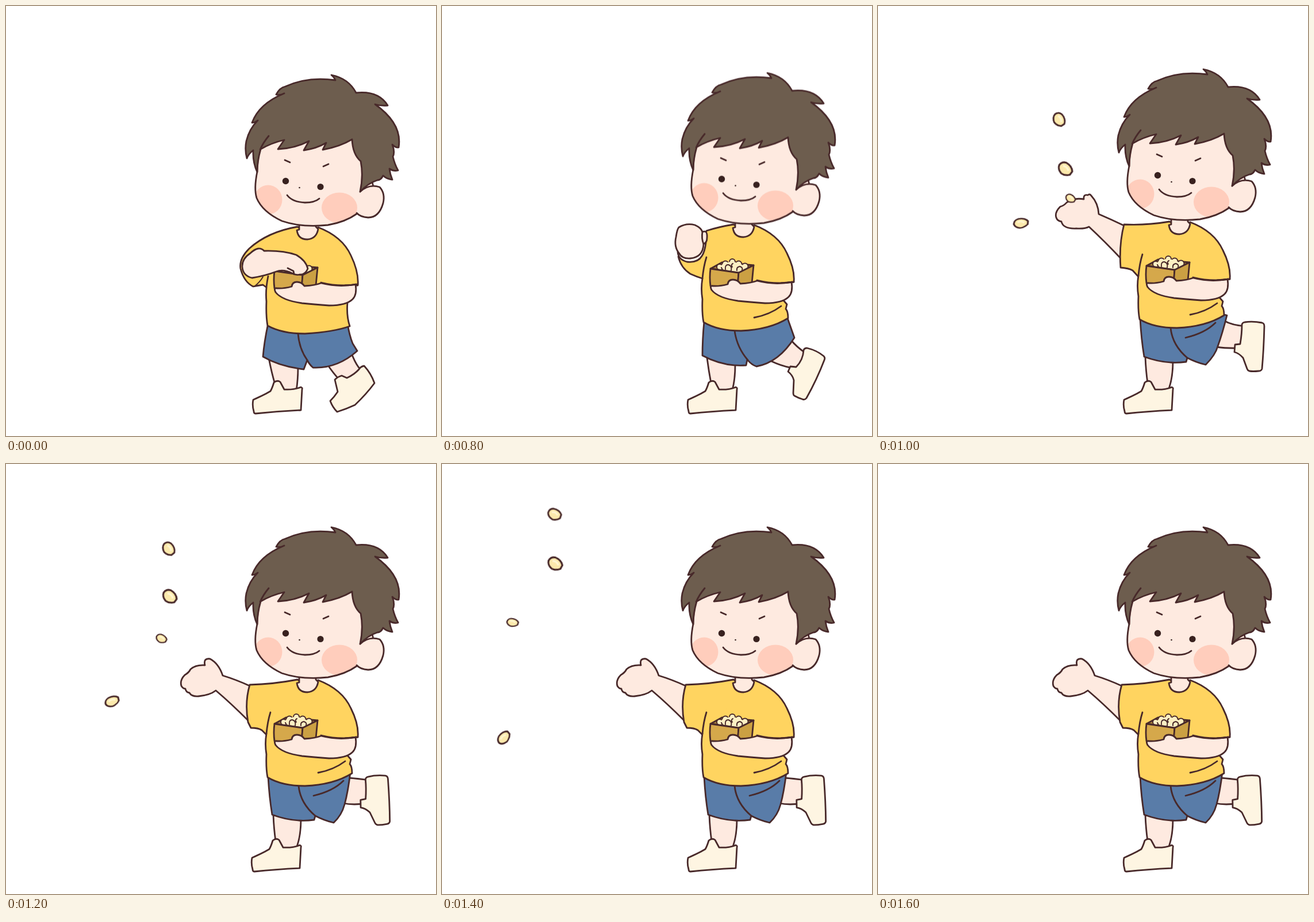
An HTML page without scripts for the animation above (1800 ms loop, 748 px wide and 748 px high).

```html
<!DOCTYPE html>
<html lang="en">
<head>
<meta charset="utf-8">
<title>Boy tossing popcorn</title>
<style>
  html, body { margin: 0; width: 100%; height: 100%; overflow: hidden; background: #fff; }
  svg { display: block; width: 100vw; height: 100vh; }

  .ink { stroke: #48292a; stroke-width: 2.8; stroke-linecap: round; stroke-linejoin: round; fill: none; }
  .skin { fill: #feeae0; }
  .shirt { fill: #ffd460; }
  .shorts { fill: #597ca8; }
  .shoe { fill: #fef5e2; }
  .hair { fill: #6d5d4e; }
  .corn { fill: #fdf0c4; }
  .thin { stroke-width: 2; }
  .dot { fill: #38211f; }
  .cheek { fill: #ffcdbc; }
  .kernel .ink { stroke-width: 2.9; }

  /* Poses are held, then switched hard. */
  .ready, .wind, .toss, .hold, .after, .thrown, .lift, .kernel {
    animation: 1.8s step-end infinite;
  }
  .ready { animation-name: ready; }
  .wind { animation-name: wind; }
  .toss { animation-name: toss; }
  .hold { animation-name: hold; }
  .after { animation-name: after; }
  .thrown { animation-name: thrown; }
  .lift { animation-name: lift; }
  .kernel { animation-name: fly; }

  @keyframes ready { 0% { visibility: visible } 44.44%, 100% { visibility: hidden } }
  @keyframes after { 0% { visibility: hidden } 44.44%, 100% { visibility: visible } }
  @keyframes wind { 0% { visibility: hidden } 44.44% { visibility: visible } 55.55%, 100% { visibility: hidden } }
  @keyframes toss { 0% { visibility: hidden } 55.55% { visibility: visible } 66.66%, 100% { visibility: hidden } }
  @keyframes hold { 0% { visibility: hidden } 66.66%, 100% { visibility: visible } }
  @keyframes thrown { 0% { visibility: hidden } 55.55%, 100% { visibility: visible } }
  @keyframes lift {
    0% { transform: translateY(var(--low)) }
    44.44% { transform: translateY(var(--mid)) }
    55.55%, 100% { transform: translateY(var(--high)) }
  }
  @keyframes fly {
    0% { visibility: hidden }
    55.55% { visibility: visible; transform: var(--near) }
    66.66% { visibility: visible; transform: var(--mid) }
    77.77% { visibility: visible; transform: var(--far) }
    88.88%, 100% { visibility: hidden }
  }
  .torso { --low: 4px; --mid: 0px; --high: -5px; }
  .head { --low: 0px; --mid: -3.5px; --high: -10px; }
</style>
</head>
<body>
<svg viewBox="0 0 748 748">
  <defs>
    <path id="front-shoe" class="shoe" d="M428 685Q450 675 458 670Q461 665 464 655Q470 650 475 654L482 667Q499 668 511 663Q514 664 513 667L511 703Q470 705 432 709Q429 709 429 705Q426 695 428 685Z"/>
    <path id="back-shoe" class="shoe" d="M633 555Q633 551 638 550Q652 548 668 551Q672 552 672 557Q671 598 668 631Q667 635 662 635Q652 636 646 635Q643 634 642 631L635 612Q628 604 620 602L621 589L630 588Q633 570 633 555Z"/>
    <path id="face" d="M448 220Q437 262 437 288Q431 318 436 334Q446 358 480 374Q515 386 560 381Q590 376 611 361L640 320L620 220Z"/>
    <clipPath id="face-clip"><use href="#face"/></clipPath>
    <g id="popped">
      <path class="ink" style="fill: #fce9ac" d="M-11-3Q-9-10-2-10Q8-8 11 0L9 6Q3 10-4 8Q-11 4-11-3Z"/>
      <path fill="none" stroke="#fff6d2" stroke-width="3" d="M-5-4Q2-5 5 1"/>
    </g>
  </defs>

  <!-- Legs and shorts -->
  <g class="ink ready">
    <path class="skin" d="M457 612Q462 638 468 658L474 682H504L505 669Q508 650 508 628Z"/>
    <use href="#front-shoe" x="2"/>
    <path class="skin" d="M558 622Q570 640 580 650L600 668L628 645L613 628Q606 618 601 604Z"/>
    <path class="shoe" d="M572 650Q577 645 584 643L593 647Q606 641 614 632Q617 627 623 626Q635 639 641 656Q627 675 607 694Q592 701 576 706Q568 698 564 687Q571 680 577 671Z"/>
    <path class="shorts" d="M456 552Q449 585 447 610Q476 627 518 632L524 616Q528 624 534 629Q576 631 611 600L603 587Q597 572 594 552Z"/>
    <path d="M508 570Q510 596 524 616"/>
  </g>
  <g class="ink wind">
    <path class="skin" d="M461 612Q464 635 468 656L474 682H504L505 668Q510 650 510 624Z"/>
    <path class="skin" d="M573 618Q590 626 606 629L624 640L644 612L630 602Q616 592 607 581Z"/>
    <path class="shoe" d="M629 599Q630 595 635 595Q652 599 664 609Q667 612 665 616Q652 650 634 682Q631 686 627 684Q620 682 613 678Q611 677 611 673L612 651Q610 642 602 636L606 627L616 628Q628 616 629 599Z"/>
    <path class="shorts" d="M456 549Q453 580 453 608Q490 628 529 625L531 615Q538 624 547 627Q586 620 613 577L601 543Z"/>
    <path d="M509 565Q513 594 532 616"/>
  </g>
  <g class="ink thrown">
    <path class="skin" d="M465 611Q466 635 469 656L474 682H504L505 668Q513 648 513 618Z"/>
  </g>
  <g class="ink toss">
    <path class="skin" d="M601 547Q617 556 640 557L634 595Q607 596 588 593Z"/>
    <use href="#back-shoe"/>
    <path class="shorts" d="M456 544Q458 580 463 610Q500 624 536 619L538 612Q553 620 570 624Q587 607 591 592Q599 570 607 538L590 534Z"/>
  </g>
  <g class="ink hold">
    <path class="skin" d="M596 546Q610 547 632 550L628 590Q605 594 586 590Z"/>
    <use href="#back-shoe" transform="translate(-8 -5.500) rotate(-5.600 633 551)"/>
    <path class="shorts" d="M456 544Q458 580 463 610Q500 624 536 619L538 612Q553 620 570 624Q584 611 589 592Q595 570 599 536Z"/>
  </g>
  <g class="ink thrown">
    <path d="M509 560Q512 590 538 612M535 577Q569 569 587 551"/>
  </g>
  <g class="ink after"><use href="#front-shoe"/></g>

  <!-- Throwing arm and its sleeve -->
  <g class="ink ready">
    <path class="shirt" d="M535 399L507 384Q455 393 423 422Q405 440 408 457Q414 480 430 488Q440 486 447 485L455 491"/>
  </g>
  <g class="ink wind">
    <path class="shirt" d="M535 395L507 380Q482 384 460 391L456 415L411 436Q416 456 432 466Q443 471 453 474"/>
    <path fill="#fff8ef" d="M410 428Q411 441 426 445Q445 447 452 435Q457 428 459 412Z"/>
    <path class="skin" d="M407 402Q409 388 412 385Q425 377 440 381Q451 386 453 393Q462 389 461 403Q461 412 455 414Q454 437 432 439Q418 440 413 431Q403 419 407 402Z"/>
    <path d="M453 393Q451 404 455 414"/>
  </g>
  <g class="ink toss">
    <path class="skin" d="M428 382Q405 371 384 362Q383 343 371 330Q368 326 365 329Q357 327 358 336Q340 333 328 342Q324 347 317 349Q307 359 310 368Q312 374 319 375Q322 388 345 387Q360 388 367 384Q395 410 425 442"/>
    <path class="shirt" d="M535 390L507 375Q465 382 428 380Q419 415 422 455Q436 456 443 460L453 471"/>
  </g>
  <g class="ink hold">
    <path class="skin" d="M424 386Q400 375 377 368Q370 347 355 339Q343 337 346 350Q330 349 321 357Q318 363 311 367Q302 376 305 386Q308 391 312 391Q313 397 319 398Q323 405 335 404Q355 402 365 394Q391 416 422 447"/>
    <path class="shirt" d="M535 390L507 375Q465 383 424 384Q415 415 421 449L426 459Q439 459 445 463L453 471"/>
  </g>

  <!-- Torso, holding arm and box -->
  <g class="lift torso">
    <g class="ink ready">
      <path class="shirt" d="M456 466Q451 490 453 510Q452 535 455 552Q480 566 520 566Q570 563 598 553Q592 535 594 512L590 482L612 482Q614 459 600 430Q585 397 543 381"/>
    </g>
    <g class="ink after">
      <path class="shirt" d="M453 474Q450 492 453 510Q452 535 455 550Q480 565 520 565Q570 563 602 543Q602 531 598 527L600 519L594 512L590 482L612 480Q614 458 600 430Q585 397 543 381"/>
      <path d="M460 437Q455 453 453 474M543 542Q570 537 590 522"/>
    </g>
    <g class="ink">
      <path class="skin" d="M510 372V385L506 386Q508 402 524 402Q540 401 543 384L539 380V372"/>
      <path fill="#a8823c" d="M467 457L487 446L542 451L516 464Z"/>
      <g class="corn thin">
        <circle cx="483" cy="454" r="5"/>
        <circle cx="527" cy="453" r="5.500"/>
        <circle cx="493" cy="449" r="5.500"/>
        <circle cx="516" cy="449" r="5.500"/>
        <circle cx="505" cy="445" r="5"/>
        <path stroke="none" d="M481 457L489 448L505 444L522 450L529 456L516 463Z"/>
        <path d="M493 458Q492 450 498 450Q505 452 503 460M513 460Q512 454 518 453Q524 455 522 459M506 448Q502 450 505 454M486 455L488 459"/>
      </g>
      <path fill="#d5a84b" d="M467 457L516 464L514 489L467 487Q465 472 467 457Z"/>
      <path fill="#cba043" d="M516 464L542 451L539 482L514 489Z"/>
      <path class="skin" d="M548 478Q580 486 608 480Q611 498 603 506Q592 517 562 517Q535 515 515 513Q480 508 469 494Q465 486 471 487Q482 488 497 484Q498 476 506 476Q514 476 519 483Q538 482 548 478Z"/>
      <path d="M548 477Q580 485 612 480"/>
    </g>
  </g>

  <g class="ink ready">
    <path class="skin" d="M411 454Q410 440 425 430Q440 416 449 426Q482 425 505 433Q522 443 525 457Q520 468 511 467Q504 469 498 465Q482 457 470 462Q452 469 428 473Q412 469 411 454Z"/>
    <path d="M490 456L500 461L501 466"/>
    <path class="thin" d="M432 488Q442 480 447 471"/>
  </g>

  <!-- Head -->
  <g class="lift head">
    <use href="#face" class="skin"/>
    <g class="cheek" clip-path="url(#face-clip)">
      <ellipse cx="456" cy="337" rx="24.500" ry="25.500"/>
      <ellipse cx="580" cy="351" rx="31" ry="26.500"/>
    </g>
    <g class="ink">
      <use href="#face"/>
      <path class="skin" d="M616 323Q632 309 650 315Q660 326 656 343Q649 368 630 368Q616 367 610 360"/>
      <path class="hair" d="M470 154Q476 142 486 140Q525 122 573 129Q571 124 566 120Q596 126 609 151Q648 147 664 173Q652 174 642 171Q690 205 683 246Q678 247 672 241Q677 254 673 262Q676 275 682 286Q674 288 667 283Q668 293 672 302Q662 301 656 295Q652 303 646 303Q630 308 616 323Q622 295 617 270Q603 258 602 232Q580 245 551 250L557 238Q540 248 518 251L527 235Q502 248 473 249L484 233Q462 238 443 249Q437 270 437 289Q429 272 430 251Q422 257 419 265Q415 250 418 235Q423 214 438 199Q433 203 428 203Q440 170 484 152Q476 156 470 154Z"/>
      <path d="M457 226Q447 238 442 250"/>
      <path d="M485 268L494 272M552 279L561 275M489 329Q498 341 520 342Q537 342 545 335"/>
    </g>
    <g class="dot">
      <circle cx="486.500" cy="304.500" r="5.700"/>
      <circle cx="547" cy="314.500" r="5.600"/>
      <circle cx="510.500" cy="316" r="1.300"/>
    </g>
  </g>

  <!-- Flying popcorn -->
  <use class="kernel" href="#popped" style="--near: translate(315px,198px) rotate(38deg) scale(1.06); --mid: translate(283px,148px) rotate(32deg) scale(1.06); --far: translate(196px,88px) rotate(0deg) scale(1.04)"/>
  <use class="kernel" href="#popped" style="--near: translate(326px,284px) rotate(18deg) scale(1.14); --mid: translate(285px,231px) rotate(18deg) scale(1.14); --far: translate(197px,174px) rotate(10deg) scale(1.14)"/>
  <use class="kernel" href="#popped" style="--near: translate(335px,335px) rotate(14deg) scale(.78,.72); --mid: translate(270.500px,304px) rotate(8deg) scale(.84,.76); --far: translate(123px,276px) rotate(-4deg) scale(.9,.74)"/>
  <use class="kernel" href="#popped" style="--near: translate(249px,378px) rotate(-18deg) scale(1.14,.88); --mid: translate(185px,413px) rotate(-36deg) scale(1.12,.9); --far: translate(108px,476px) rotate(-62deg) scale(1.12,.92)"/>
</svg>
</body>
</html>
```
